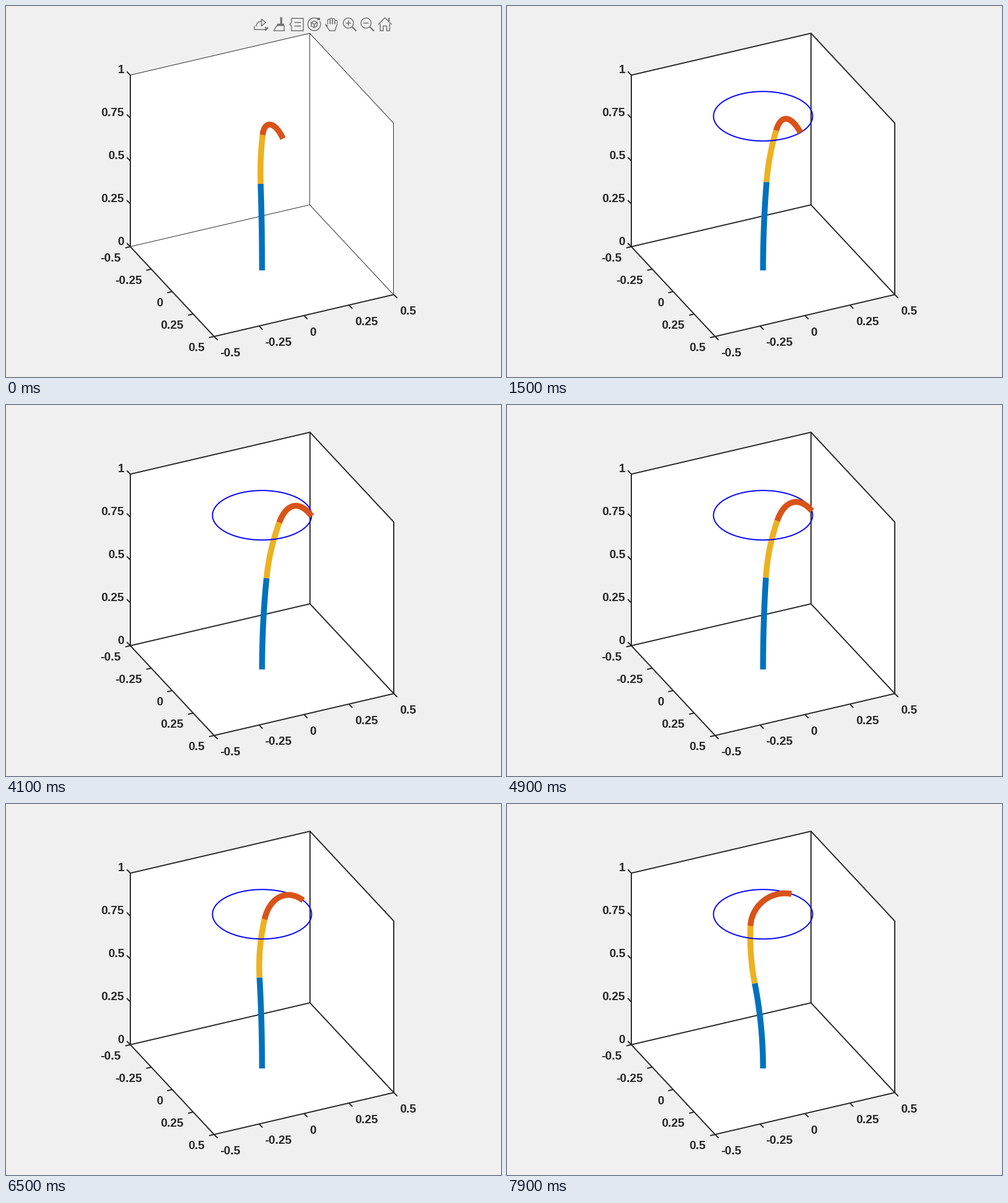
Recreate the animation shown at these times as a matplotlib script. Size 840 px wide and 630 px high, loop 8000 ms.

```python
import numpy as np
import matplotlib.pyplot as plt
from matplotlib.animation import FuncAnimation

W, H, DPI = 840, 630, 100
DARK, GREY = "#262626", "#757575"
BLUE, YELLOW, RED = "#0072BD", "#EDB120", "#D95319"

# Orthographic view of the unit box
CX, CY, SCALE = 434.5, 449.4, 336.4
AZ, EL = np.radians(65), np.radians(30)

fig = plt.figure(figsize=(W / DPI, H / DPI), dpi=DPI, facecolor="#F0F0F0")
ax = fig.add_axes([0, 0, 1, 1])
ax.set_xlim(0, W)
ax.set_ylim(H, 0)
ax.axis("off")


def project(x, y, z):
    across = x * np.cos(AZ) + y * np.sin(AZ)
    depth = y * np.cos(AZ) - x * np.sin(AZ)
    rise = z * np.cos(EL) + depth * np.sin(EL)
    return np.stack([CX + SCALE * across, CY - SCALE * rise], -1)


def line(pts, color=DARK, px=2.0, z=2):
    x, y = np.transpose(pts)
    return ax.plot(x, y, color=color, lw=px * 72 / DPI, zorder=z, snap=False,
                   solid_capstyle="butt", solid_joinstyle="miter")[0]


# Box: floor corners, then the same corners at the top
corners = [(-0.5, -0.5), (0.5, -0.5), (0.5, 0.5), (-0.5, 0.5)]
left, front, right, back = (project(x, y, 0) for x, y in corners)
left_top, _, right_top, back_top = (project(x, y, 1) for x, y in corners)

ax.fill(*np.transpose([left, front, right, right_top, back_top, left_top]),
        color="white", lw=0, zorder=1)
edges = [np.array(e) for e in ([left_top, back_top, right_top, right],
                               [left, back, right], [back, back_top])]
thick = [line(e) for e in edges]
thin = [line(e - (0.5, 0), px=1) for e in edges]
line([left_top, left, front, right])


def ruler(start, end, first, tick, shift, ha):
    for u in np.linspace(0, 1, 5):
        p = start + (end - start) * u
        line([p, p + tick])
        ax.text(*(p + shift), f"{first + u:g}", color=DARK, ha=ha,
                va="baseline", family="Liberation Sans", weight="bold",
                size=20 * 72 / DPI, zorder=3)


ruler(left, left_top, 0, (-6, -6), (-10.3, -3.2), "right")
ruler(left, front, -0.5, (-8.5, 2), (-16, 25), "right")
ruler(front, right, -0.5, (6, 6), (10, 34), "left")

# Toolbar, each icon drawn around its own centre
bar = []


def icon(cx, pts, px=1.6):
    bar.append(line(np.array(pts) + (cx, 31), GREY, px, 5))


def arc(r, a0=0, a1=360, n=30, x=0, y=0):
    a = np.radians(np.linspace(a0, a1, n))
    return np.column_stack([x + r * np.cos(a), y + r * np.sin(a)])


def export_icon(cx):
    icon(cx, [(-11, 3), (-11, 9), (8, 9), (8, 4)])
    icon(cx, arc(9, 180, 270, x=1, y=4))
    icon(cx, [(1, -9), (8, -3), (1, 3), (1, -9)])
    icon(cx, [(7, 10.5), (12, 5.5)], 3)


def brush_icon(cx):
    icon(cx, [(3, -12), (3, -1)], 3.5)
    icon(cx, [(-4, 1), (8, 1)], 4)
    icon(cx, [(-4, 2), (-10, 11), (8, 11), (8, 2)])


def note_icon(cx):
    icon(cx, [(-9, -3), (-9, -10), (11, -10), (11, 11), (-9, 11), (-9, 3),
              (-12, 0), (-9, -3)])
    for y in (-3, 3):
        icon(cx, [(-4, y), (7, y)])


def rotate_icon(cx):
    icon(cx, arc(10.8, -30, 300))
    icon(cx, [(5, -9), (10, -9)], 4)
    icon(cx, arc(5.8, 30, 390, 7))
    for a in (90, 210, 330):
        icon(cx, [(0, 0), arc(5.8, a, a, 1)[0]])


def hand_icon(cx):
    for k in range(4):
        x, top = 4 * k - 5, 1.2 * (k - 1.2) ** 2 - 8.5
        icon(cx, np.vstack([(x - 2, 0), arc(2, 180, 360, 8, x, top),
                            (x + 2, 0)]), 1.4)
    icon(cx, [(-7, 3), (-11, 0), (-4, 11), (5, 11), (9, 0)])


def zoom_icon(cx, plus):
    icon(cx, arc(8.6, x=-2, y=-2))
    icon(cx, [(-6.5, -2), (2.5, -2)])
    if plus:
        icon(cx, [(-2, -6.5), (-2, 2.5)])
    icon(cx, [(4, 4), (11.5, 11.5)], 2.4)


def home_icon(cx):
    icon(cx, [(-11.5, 0.5), (0, -11), (11.5, 0.5)])
    icon(cx, [(7, -5), (7, -11)], 2.4)
    for s in (-1, 1):
        icon(cx, [(8 * s, -1), (8 * s, 11), (3 * s, 11), (3 * s, 3), (0, 3)])


export_icon(432.5)
brush_icon(464)
note_icon(493.5)
rotate_icon(523)
hand_icon(553)
zoom_icon(583, True)
zoom_icon(613, False)
home_icon(643)


# Circle followed by the tip, three degrees a step
def on_circle(deg):
    a = np.radians(deg)
    return project(np.cos(a) / 4, np.sin(a) / 4, 0.9)


path = line(on_circle(np.linspace(0, 360, 241)), "#0000FF", 2, 7)

BASE = np.array([CX, 449.0])
T = np.linspace(0, 1, 40)[:, None]


def unit(v):
    return v / np.hypot(*v)


def quad(a, b, c):
    return (1 - T) ** 2 * a + 2 * T * (1 - T) * b + T ** 2 * c


def cubic(a, b, c, d):
    return (1 - T) * quad(a, b, c) + T * quad(b, c, d)


def arm(n):
    """Three bending sections: joints sway sideways, rise, then dip late."""
    dip = (n / 40) ** 6
    j1 = np.array([CX - 11 + 20 * np.cos(0.0713 * (n - 15.8)),
                   302 - 0.4 * n + 18.5 * dip])
    j2 = np.array([CX - 59 + 90 * np.cos(0.0495 * (n - 17)),
                   219 - 0.95 * n + 26 * dip])
    tip = on_circle(3 * n)

    # Each section leaves along the end direction of the one before
    c1 = np.array([BASE[0], (BASE[1] + j1[1]) / 2])
    c2 = j1 + unit(j1 - c1) * np.hypot(*(j2 - j1)) / 2
    slope = np.radians(65.5 - 0.55 * n - 32.5 * dip)
    h1 = j2 + unit(j2 - c2) * (25 + 0.52 * n - 12 * dip)
    h2 = tip - (33.5 + 3 * dip) * np.array([np.cos(slope), np.sin(slope)])
    return quad(BASE, c1, j1), quad(j1, c2, j2), cubic(j2, h1, h2, tip)


parts = [line([BASE, BASE], c, 10, z)
         for c, z in ((BLUE, 6), (YELLOW, 6), (RED, 8))]


def update(frame):
    for part, pts in zip(parts, arm((frame + 1) // 2)):
        part.set_data(*pts.T)
    opening = frame == 0
    for art in bar + thin:
        art.set_visible(opening)
    for art in thick + [path]:
        art.set_visible(not opening)
    return parts


anim = FuncAnimation(fig, update, frames=80, interval=100, repeat=True,
                     repeat_delay=0, blit=False)
plt.show()
```
